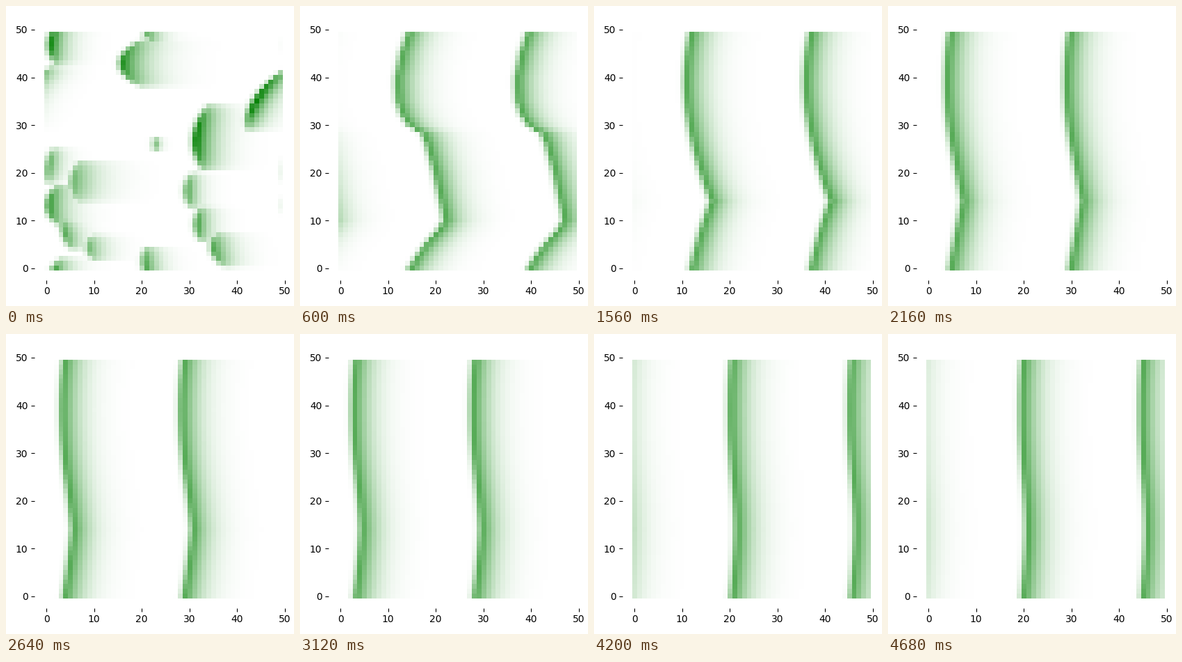
Animation, 414 px wide and 431 px high, one loop 4.8 s. Source, as a matplotlib script:

```python
import numpy as np
import matplotlib.pyplot as plt
from matplotlib.animation import FuncAnimation
from matplotlib.colors import LinearSegmentedColormap

W, H, DPI = 414, 431, 100
FRAMES, INTERVAL = 40, 120
N, WAVELENGTH = 50, 25
SPEED = 6.395          # cells travelled to the left per frame
MERGED = 5             # frame at which the patches have joined into bands
PEAK, TAIL = 0.66, 3.2

# Initial patches: x, y, half height, density, tail, slope, bend
PATCHES = [
    (1.0, 47.3, 5.0, 0.90, 2.6, 0.10, 0.08),
    (16.0, 43.0, 5.3, 0.85, 4.2, 0.05, 0.17),
    (20.8, 0.7, 4.2, 0.68, 2.4, -0.15, 0.08),
    (31.4, 27.3, 7.3, 1.00, 3.2, 0.08, 0.05),
    (44.2, 35.5, 7.0, 1.00, 2.7, 0.65, 0.06),
    (29.6, 16.2, 4.0, 0.64, 2.0, 0.00, 0.08),
    (31.7, 9.2, 4.0, 0.72, 2.2, 0.00, 0.08),
    (35.2, 3.8, 3.9, 0.68, 2.9, -0.20, 0.12),
    (23.0, 26.0, 1.6, 0.45, 0.9, 0.00, 0.00),
    (0.6, 21.5, 4.0, 0.60, 2.0, 0.15, 0.04),
    (5.7, 18.2, 4.8, 0.55, 4.2, 0.05, 0.08),
    (0.6, 13.2, 4.8, 0.76, 3.1, 0.00, 0.12),
    (4.0, 7.3, 3.6, 0.64, 2.4, -0.30, 0.05),
    (9.0, 4.2, 3.0, 0.52, 2.8, -0.10, 0.15),
]

# Lag of the young band behind its foremost point
KINK_Y = [0, 2, 4, 6, 8, 10, 12, 16, 20, 24, 26, 28, 29, 30, 32, 35, 38, 40, 45, 49]
KINK_LAG = [2.7, 4, 5.3, 7, 8.8, 10, 9.7, 8.8, 8, 6.9, 6.4, 5.5, 4, 2.5, 1.2, 0.2,
            0, 0, 1, 2.3]

# How far the lag has relaxed over time
RELAX_T = [5, 13, 22, 29, 35, 39]
RELAX_LAG = [10, 5.4, 2.4, 1.5, 1.3, 1.2]

X = np.arange(N)[None, :]
Y = np.arange(N)[:, None]


def lerp(a, b, k):
    return a + (b - a) * k


def smooth(k):
    k = np.clip(k, 0, 1)
    return k * k * (3 - 2 * k)


def wrap(v, period, back):
    return (v + back) % period - back


def profile(d, tail):
    """Sharp uphill edge on the left, long decay on the right."""
    return np.where(d < 0, np.exp(-d ** 2), np.exp(-(np.abs(d) / tail) ** 1.1))


def front(y, t):
    """Position of the band's edge in each row."""
    dy = wrap(y - 14, N, 25)
    kink = np.interp(y, KINK_Y, KINK_LAG, period=N) / 10
    cusp = (1 - np.abs(dy) / 25) ** 1.75
    wave = ((1 + np.cos(2 * np.pi * dy / N)) / 2) ** 1.3
    shape = lerp(kink, cusp, np.clip((t - 5) / 8, 0, 1))
    shape = lerp(shape, wave, np.clip((t - 13) / 17, 0, 1))
    lag = np.exp(np.interp(t, RELAX_T, np.log(RELAX_LAG)))
    return 12.2 - SPEED * (t - MERGED) + lag * shape


def bands(t):
    return PEAK * profile(wrap(X - front(Y, t), WAVELENGTH, 4), TAIL)


def patches(t):
    """Patches drift left, stretch along the slope and line up as bands."""
    k = t / MERGED
    s = smooth(k)
    field = np.zeros((N, N))
    for x, y, h, amp, tail, slope, bend in PATCHES:
        dy = wrap(Y - y, N, 25)
        near = np.clip(dy, -h, h)
        edge = x + slope * near + bend * near ** 2 - SPEED * t
        turn = np.round((x - SPEED * t - front(y, t)) / WAVELENGTH)
        edge = lerp(edge, front(Y, t) + WAVELENGTH * turn, s)
        reach = lerp(h, 25, k * k)
        window = np.clip(1 - (dy / reach) ** 2, 0, 1) ** (0.7 * (1 - k))
        d = wrap(X - edge, N, 8)
        part = lerp(amp, PEAK, s) * window * profile(d, lerp(tail, TAIL, s))
        field = np.maximum(field, part)
    return field


def density(t):
    return patches(t) if t < MERGED else bands(t)


plt.rcParams["font.family"] = "DejaVu Sans"
# the small margin keeps the pixel size from being rounded down
fig = plt.figure(figsize=((W + 0.01) / DPI, (H + 0.01) / DPI), dpi=DPI,
                 facecolor="white")
side = 369.6
ax = fig.add_axes([41.2 / W, 37.4 / H, side / W, side / H])
greens = LinearSegmentedColormap.from_list("cover", ["white", "green"])
image = ax.imshow(density(0), cmap=greens, vmin=0, vmax=1, origin="lower",
                  interpolation="nearest", aspect="auto")
ax.set(xlim=(-2.45, 51.45), ylim=(-2.45, 51.45),
       xticks=range(0, 51, 10), yticks=range(0, 51, 10))
ax.spines[:].set_visible(False)


def update(i):
    image.set_data(density(i))
    return [image]


anim = FuncAnimation(fig, update, frames=FRAMES, interval=INTERVAL,
                     repeat=True, repeat_delay=0)
plt.show()
```
